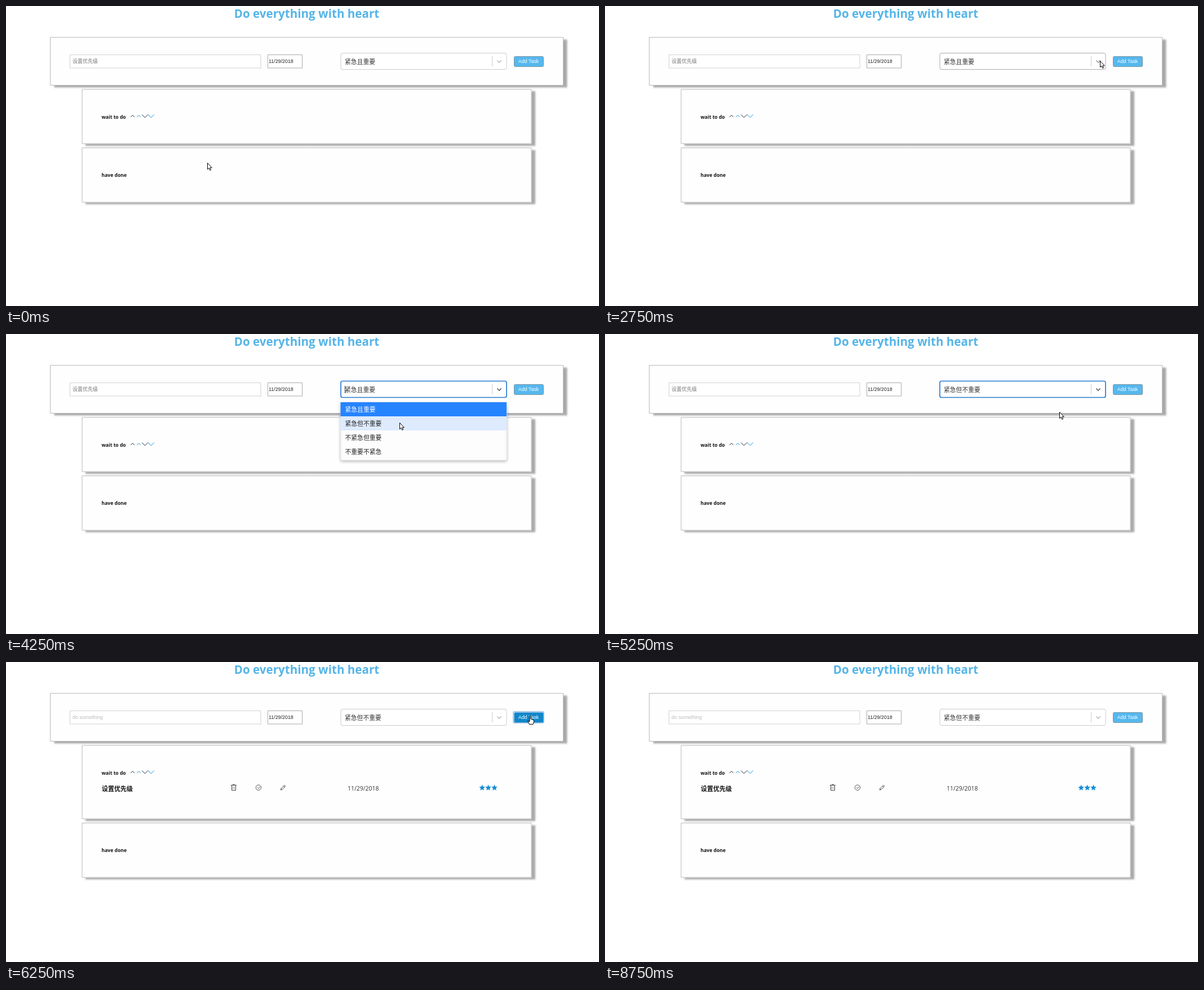
Recreate the animation shown at these times as an HTML page with a canvas. Size 1052 px wide and 532 px high, loop 9 s.

```html
<!DOCTYPE html>
<html lang="en">
<head>
<meta charset="utf-8">
<title>Task list</title>
<style>
  html, body { margin: 0; width: 100%; height: 100%; overflow: hidden; background: #fff; }
  canvas { display: block; }
</style>
</head>
<body>
<canvas id="stage" width="1052" height="532"></canvas>
<script>
const ctx = document.getElementById('stage').getContext('2d');
const LOOP = 9000, STEP = 250;
const UI = '"Open Sans", "Noto Sans", sans-serif';
const FORM = '"Liberation Sans", Arial, sans-serif';
const CJK = '"Noto Sans CJK SC", "Noto Sans CJK", sans-serif';
const OPTIONS = ['紧急且重要', '紧急但不重要', '不紧急但重要', '不重要不紧急'];
const DARK = '#1c2733', BLUE = '#1790d6', INK = '#444';
const ROW = 25, MENU_TOP = 121;

// Moments when the state of the page changes
const AT = { hover: 1750, open: 3250, pick: 4500, press: 5750, added: 6000, leave: 6750, gone: 8000, blur: 8750 };

// Pointer moves; it rests wherever the last one ended
const HOME = { x: 357, y: 278 };
const MOVES = [
  { from: 250, to: 1000, x: 461, y: 124 },
  { from: 1000, to: 2250, x: 911, y: 112 },
  { from: 2250, to: 2750, x: 878, y: 97 },
  { from: 3250, to: 4250, x: 698, y: 157 },
  { from: 5000, to: 5250, x: 806, y: 138 },
  { from: 5250, to: 6000, x: 930, y: 95 },
  { from: 6500, to: 7750, x: 551, y: 502 }
];

function pointerAt(t) {
  let { x, y } = HOME;
  for (const move of MOVES) {
    const k = Math.min(1, Math.max(0, (t - move.from) / (move.to - move.from)));
    x += (move.x - x) * k;
    y += (move.y - y) * k;
  }
  return { x: Math.round(x), y: Math.round(y) };
}

function text(str, x, y, font, color, align = 'left') {
  ctx.font = font;
  ctx.fillStyle = color;
  ctx.textAlign = align;
  ctx.fillText(str, x, y);
}

function stroke(color, width = 1, path) {
  ctx.strokeStyle = color;
  ctx.lineWidth = width;
  path ? ctx.stroke(path) : ctx.stroke();
}

function line(points, color, width) {
  ctx.beginPath();
  points.forEach(([x, y]) => ctx.lineTo(x, y));
  stroke(color, width);
}

function box(x, y, w, h, fill, border, radius = 0, width = 1) {
  ctx.beginPath();
  ctx.roundRect(x, y, w, h, radius);
  if (fill) { ctx.fillStyle = fill; ctx.fill(); }
  if (border) stroke(border, width);
}

function shadowed(color, dx, dy, blur, draw) {
  ctx.save();
  Object.assign(ctx, { shadowColor: color, shadowOffsetX: dx, shadowOffsetY: dy, shadowBlur: blur });
  draw();
  ctx.restore();
}

function card(x, y, w, h) {
  shadowed('#a8a8a8', 6.5, 3.5, 3, () => box(x, y, w + 1, h + 1, '#fff'));
  box(x + .5, y + .5, w, h, '#fefefe', '#b9b9b9');
}

function chevron(x, y, w, h, color, width) {
  line([[x - w, y - h], [x, y + h], [x + w, y - h]], color, width);
}

function drawSelect(t) {
  const open = t >= AT.open && t < AT.pick;
  const focused = t >= AT.open && t < AT.added;
  const hovered = t >= AT.hover && t < AT.open;
  const border = focused ? '#2b7bd2' : hovered ? '#aaa' : '#ccc';
  box(594, 83.5, 294, 29, '#fff', border, 3, focused ? 1.7 : 1);
  text(OPTIONS[t < AT.pick ? 0 : 1], 601, 103, '10.8px ' + CJK, '#333');
  line([[862.5, 89], [862.5, 107]], '#ccc');
  chevron(875, 98.3, 3.6, 1.9, focused ? '#555' : hovered ? '#999' : '#bbb', 1.5);
  if (open && (t - AT.open) % 1000 < 500) line([[601.5, 92], [601.5, 105]], '#333');
}

function drawMenu(pointer) {
  const height = ROW * OPTIONS.length + 3;
  shadowed('rgba(0,0,0,.25)', 0, 2, 5, () => box(593.5, MENU_TOP, 295, height, '#fdfdfd', '#ddd', 3, .6));
  OPTIONS.forEach((label, i) => {
    const y = MENU_TOP + ROW * i;
    const hovered = pointer.y >= y && pointer.y < y + ROW;
    if (i === 0 || hovered) box(593.5, y, 294.5, ROW, i ? '#deebff' : '#2684ff');
    text(label, 601.5, y + 17, '10.8px ' + CJK, i ? '#222' : '#fff');
  });
}

function drawButton(t) {
  const hovered = t >= AT.press && t < AT.leave;
  const focused = t >= AT.added && t < AT.blur;
  if (focused) box(900, 88, 54, 20, null, '#a9cbea', 2, 2);
  box(901.5, 89.5, 52, 18, hovered ? '#0f87cb' : '#55b8ee', focused ? '#7fb4de' : '#82939e', 2);
  text('Add Task', 927, 101, '8.9px ' + FORM, '#fff', 'center');
}

function drawForm(t) {
  card(78, 55, 910, 85);
  box(113.5, 86.5, 338.5, 23.5, '#fff', '#d0d0d0');
  if (t >= AT.added) text('do something', 118, 101, '9px ' + FORM, '#bbb');
  else text('设置优先级', 118, 101.3, '9px ' + CJK, '#777');
  box(464.5, 86.5, 61, 23.5, '#fff', '#aaa');
  text('11/29/2018', 466, 101, '8.9px ' + FORM, '#222');
  drawSelect(t);
  drawButton(t);
}

function star(x, y, r) {
  ctx.beginPath();
  for (let i = 0; i < 10; i++) {
    const a = i * Math.PI / 5 - Math.PI / 2, d = i % 2 ? r * .47 : r;
    ctx.lineTo(x + d * Math.cos(a), y + d * Math.sin(a));
  }
  ctx.fillStyle = BLUE;
  ctx.fill();
}

function drawBin(x, y) {
  box(x - 3.5, y - 4, 7, 9, null, INK);
  line([[x - 5, y - 4], [x + 5, y - 4]], INK);
  line([[x - 2, y - 5.3], [x + 2, y - 5.3]], INK);
  for (const dx of [-1.3, 1.3]) line([[x + dx, y - 2], [x + dx, y + 3]], INK, .6);
}

function drawTick(x, y) {
  ctx.beginPath();
  ctx.arc(x, y, 4.7, 0, Math.PI * 2);
  stroke(INK, .9);
  line([[x - 2.2, y], [x - .4, y + 1.7], [x + 3, y - 1.8]], INK);
}

function drawPencil(x, y) {
  ctx.save();
  ctx.translate(x, y);
  ctx.rotate(-Math.PI / 4);
  box(-4, -1.3, 9, 2.6, null, INK, 1, .9);
  line([[-4, -1.3], [-6, 0], [-4, 1.3]], INK, .9);
  line([[2.5, -1.3], [2.5, 1.3]], INK, .9);
  ctx.restore();
}

function drawTask() {
  text('设置优先级', 170, 228.5, 'bold 11px ' + CJK, '#111');
  drawBin(404, 222.5);
  drawTick(448, 222.7);
  drawPencil(491.5, 222.7);
  text('11/29/2018', 606, 228, '10.45px ' + UI, '#333');
  for (let i = 0; i < 3; i++) star(844.7 + 10.9 * i, 223.2, 5.6);
}

function drawLists(added) {
  const grow = added ? 34 : 0;
  card(134.5, 147.5, 797, 96 + grow);
  text('wait to do', 169.5, 199.5, 'bold 8.6px ' + UI, '#111');
  for (let i = 0; i < 4; i++) {
    const up = i < 2;
    chevron(224.5 + 11 * i, 195.2, up ? 3.2 : 5.3, up ? -1.6 : 2.6, i % 2 ? BLUE : DARK);
  }
  if (added) drawTask();
  card(134.5, 251 + grow, 797, 96.5);
  text('have done', 169.5, 303 + grow, 'bold 8.6px ' + UI, '#111');
}

const ARROW = new Path2D('M.5 .5V11.6L3 9.4 4.8 13.4 6.6 12.6 4.9 8.8H8.3Z');
const HAND = new Path2D('M-1 1Q0 0 1 1V6L6.5 8V11L5 15.5H-1.5L-4.5 9.5-1 10.5Z');

function drawPointer(t, { x, y }) {
  const shape = t >= AT.press && t < AT.leave ? HAND : ARROW;
  ctx.save();
  ctx.translate(x, y);
  ctx.lineJoin = 'round';
  ctx.fillStyle = '#fff';
  ctx.fill(shape);
  stroke('#000', 1, shape);
  ctx.restore();
}

function render(t) {
  const pointer = pointerAt(t);
  ctx.fillStyle = '#fff';
  ctx.fillRect(0, 0, 1052, 532);
  text('Do everything with heart', 533.5, 21, 'bold 20.6px ' + UI, '#55b5e8', 'center');
  drawForm(t);
  drawLists(t >= AT.added);
  if (t >= AT.open && t < AT.pick) drawMenu(pointer);
  if (t < AT.gone) drawPointer(t, pointer);
}

const start = performance.now();
function tick() {
  const t = (performance.now() - start) % LOOP;
  render(Math.floor(t / STEP) * STEP);
  requestAnimationFrame(tick);
}
tick();
</script>
</body>
</html>
```
